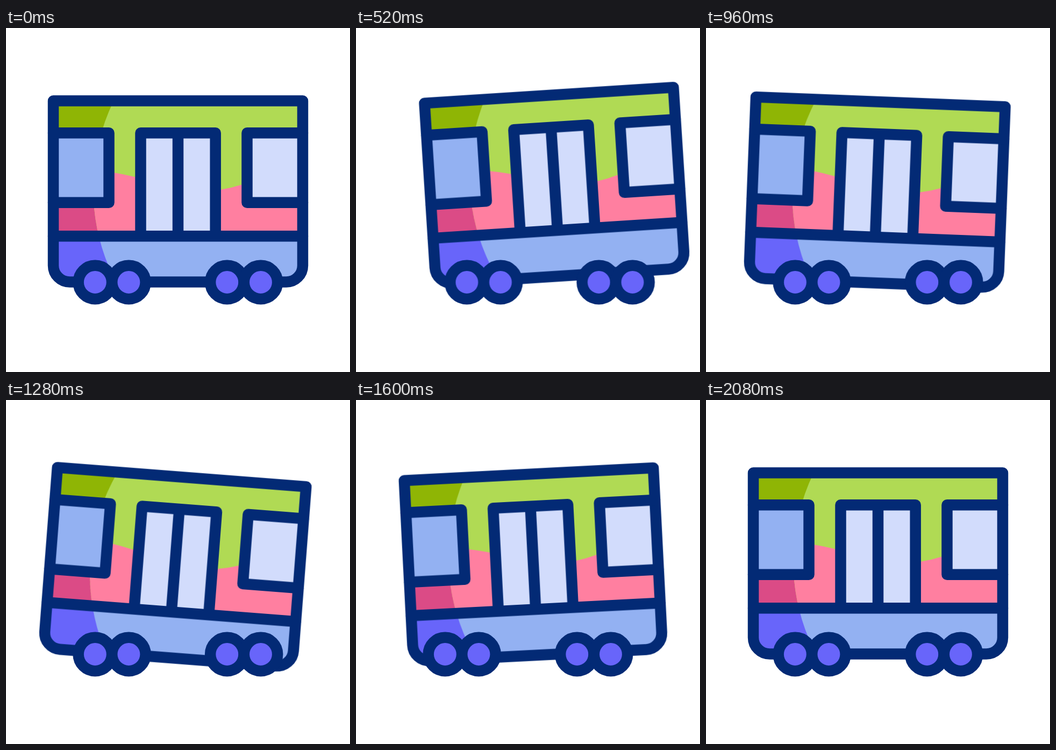
Recreate the animation shown at these times as an HTML page. Size 640 by 640 pixels, loop 2120 ms.

```html
<!DOCTYPE html>
<html lang="en">
<head>
<meta charset="utf-8">
<title>Train car</title>
<style>
  html, body { margin: 0; width: 100%; height: 100%; overflow: hidden; background: #fff; }
  svg { display: block; width: 100vw; height: 100vh; }

  .line { fill: none; stroke: #032a75; stroke-width: 20.5; stroke-linecap: round; stroke-linejoin: round; }
  .glass { fill: #d2dcfc; }
  .wheels circle { fill: #6865fa; stroke: #032a75; stroke-width: 20.5; }

  .ride { animation: ride 2120ms infinite; }
  .tilt { animation: tilt 2120ms infinite; transform-origin: 320px 304px; }
  .ride, .tilt { animation-timing-function: cubic-bezier(.53, 0, .47, 1); }

  /* the whole car rolls forward and back */
  @keyframes ride {
    0%, 1.887% { transform: translateX(0); }
    24.528%, 25.472% { transform: translateX(40.5px); }
    46.226%, 100% { transform: translateX(0); }
  }

  /* the body sways after the wheels */
  @keyframes tilt {
    0%, 7.547% { transform: translate(0, 0) rotate(0deg); }
    30.66% { transform: translate(10.3px, -12px) rotate(-4.1deg); }
    55.189% { transform: translate(-7.2px, 7.8px) rotate(5deg); }
    79.245% { transform: translate(10.6px, 2.2px) rotate(-3.2deg); }
    98.113%, 100% { transform: translate(0, 0) rotate(0deg); }
  }
</style>
</head>
<body>
<svg viewBox="0 0 640 640">
  <defs>
    <clipPath id="lit"><circle cx="537.4" cy="300" r="375"/></clipPath>
    <path id="frame" d="M88 135.5H552V442A30.5 30.5 0 0 1 521.5 472.5H118.5A30.5 30.5 0 0 1 88 442Z"/>
    <clipPath id="shell"><use href="#frame"/></clipPath>
    <path id="roof" d="M88 135H552V387H88Z"/>
    <path id="band" d="M88 255L190 267.3Q215 271.3 242 277.5L398 301Q420 297.5 442 290.5L552 250V387H88Z"/>
    <path id="base" d="M88 387H552V473H88Z"/>
  </defs>

  <g class="ride">
    <g class="tilt">
      <g clip-path="url(#shell)">
        <use href="#roof" fill="#8fb505"/>
        <use href="#band" fill="#db4b86"/>
        <use href="#base" fill="#6865fa"/>
        <g clip-path="url(#lit)">
          <use href="#roof" fill="#b0da54"/>
          <use href="#band" fill="#ff7fa0"/>
          <use href="#base" fill="#93b1f2"/>
        </g>
      </g>
      <path fill="#93b1f2" d="M88 195.3H191.5V324.7H88Z"/>
      <path class="glass" d="M448.5 195.3H552V324.7H448.5ZM250.5 195.3H389.7V387H250.5Z"/>
      <use href="#frame" class="line"/>
      <path class="line" d="M88 195.3H191.5V324.7H88M552 195.3H448.5V324.7H552M250.5 387V195.3H389.7V387M320 195.3V387M88 387.2H552"/>
    </g>
    <g class="wheels">
      <circle cx="165.8" cy="473" r="31.2"/>
      <circle cx="228.4" cy="473" r="31.2"/>
      <circle cx="411.3" cy="473" r="31.2"/>
      <circle cx="474" cy="473" r="31.2"/>
    </g>
  </g>
</svg>
</body>
</html>
```
